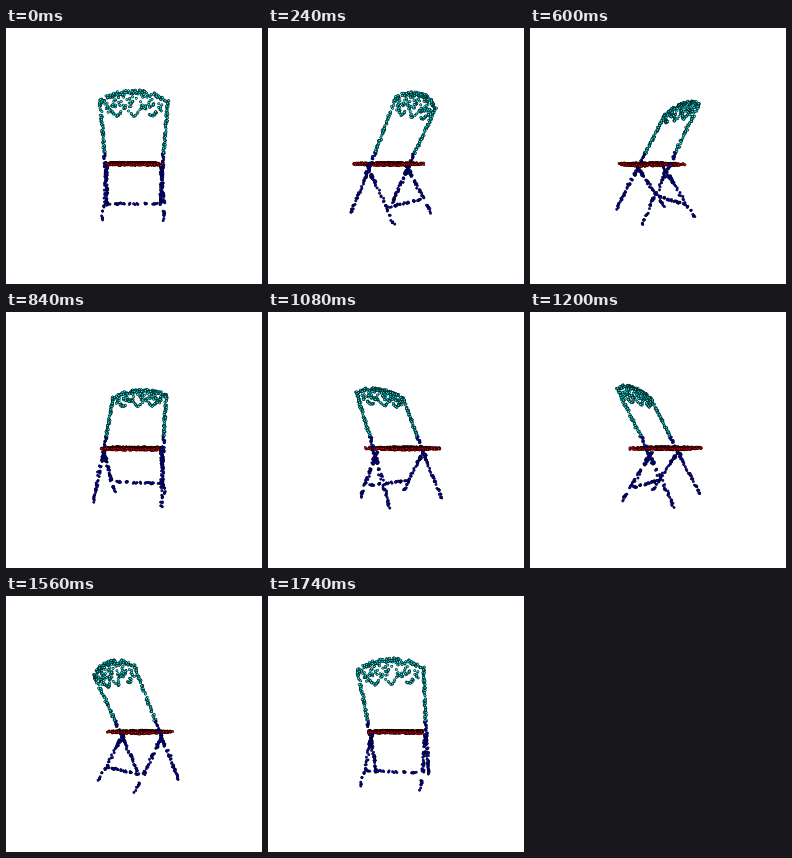
These frames come from a looping animation (256x256 px, 1.8 s). A matplotlib script:

```python
import numpy as np
import matplotlib.pyplot as plt
from matplotlib.animation import FuncAnimation

SIZE, DPI = 256, 100
FRAMES, INTERVAL = 30, 60
CAMERA = 235.0
CYAN, RED, BLUE = (0, 1, 1), (1, 0, 0), (0, 0, 0.93)

rng = np.random.default_rng(7)


def bar(start, end, count, spread=0.9):
    """Points scattered along a thin rod; axes are width, drop, depth."""
    t = rng.random((count, 1))
    rod = np.array(start) * (1 - t) + np.array(end) * t
    return rod + rng.uniform(-spread, spread, (count, 3))


def lean(drop):
    """Depth of the tilted back frame at a given height."""
    return -0.9 - 0.574 * drop


def on_back(x, drop, spread=0.8):
    pts = np.column_stack([x, drop, lean(drop)])
    return pts + rng.uniform(-spread, spread, pts.shape)


def crest(x):
    return -57 + 8 * np.abs(x / 30) ** 2.6


def make_back():
    x = rng.uniform(-30, 30, 100)
    rail = on_back(x, crest(x) + rng.uniform(0, 3, x.size))

    x = rng.uniform(-27, 27, 75)
    fill = on_back(x, crest(x) + rng.uniform(2, 13, x.size))

    x = rng.uniform(-25, 25, 55)
    scallop = on_back(x, -40 + 3.5 * np.cos(x * 2 * np.pi / 16))

    sides = [bar((s * 30, -50, lean(-50)), (s * 29.5, -3, lean(-3)), 62, 1.0)
             for s in (-1, 1)]
    return np.vstack([rail, fill, scallop, *sides])


def make_seat(count=560):
    u, v = rng.random((2, count))
    left = -27 + 0.8 * v
    right = 28.3 - 4.3 * v
    front = -37 + 4 * u
    x = left + (right - left) * u
    depth = 17 + (front - 17) * v
    return np.column_stack([x, 8 + rng.uniform(-0.9, 0.9, count), depth])


def make_legs():
    parts = []
    for s, heel in ((-1, -29), (1, 27)):
        parts.append(bar((s * 29.5, -3, lean(-3)), (s * 30, 45, lean(45)), 50, 1.2))
        parts.append(bar((s * 30, 45, lean(45)), (s * 30.5, 58, -34), 11))
        parts.append(bar((s * 28.5, 8, -12), (s * 28, 46, 15), 42, 1.2))
        parts.append(bar((s * 28, 46, 15), (heel, 58, 24), 9))
    parts.append(bar((-28, 45, 14), (28, 45, 14), 32, 0.8))
    return np.vstack(parts)


groups = [(make_back(), CYAN), (make_seat(), RED), (make_legs(), BLUE)]
points = np.vstack([p for p, _ in groups])
colors = np.vstack([np.tile(c, (len(p), 1)) for p, c in groups])


def project(angle):
    x, drop, z = points.T
    c, s = np.cos(angle), np.sin(angle)
    depth = z * c - x * s
    scale = CAMERA / (CAMERA - depth)
    xy = SIZE / 2 + np.column_stack([x * c + z * s, drop]) * scale[:, None]
    order = np.argsort(depth)
    return xy[order], colors[order]


fig = plt.figure(figsize=(SIZE / DPI, SIZE / DPI), dpi=DPI, facecolor="white")
ax = fig.add_axes([0, 0, 1, 1])
ax.set(xlim=(0, SIZE), ylim=(SIZE, 0))
ax.axis("off")
xy, face = project(0)
dots = ax.scatter(xy[:, 0], xy[:, 1], s=2.6, c=face, edgecolors="black", linewidths=0.4)


def update(i):
    xy, face = project(2 * np.pi * i / FRAMES)
    dots.set_offsets(xy)
    dots.set_facecolors(face)
    return [dots]


anim = FuncAnimation(fig, update, frames=FRAMES, interval=INTERVAL,
                     repeat=True, repeat_delay=0, blit=False)
plt.show()
```
